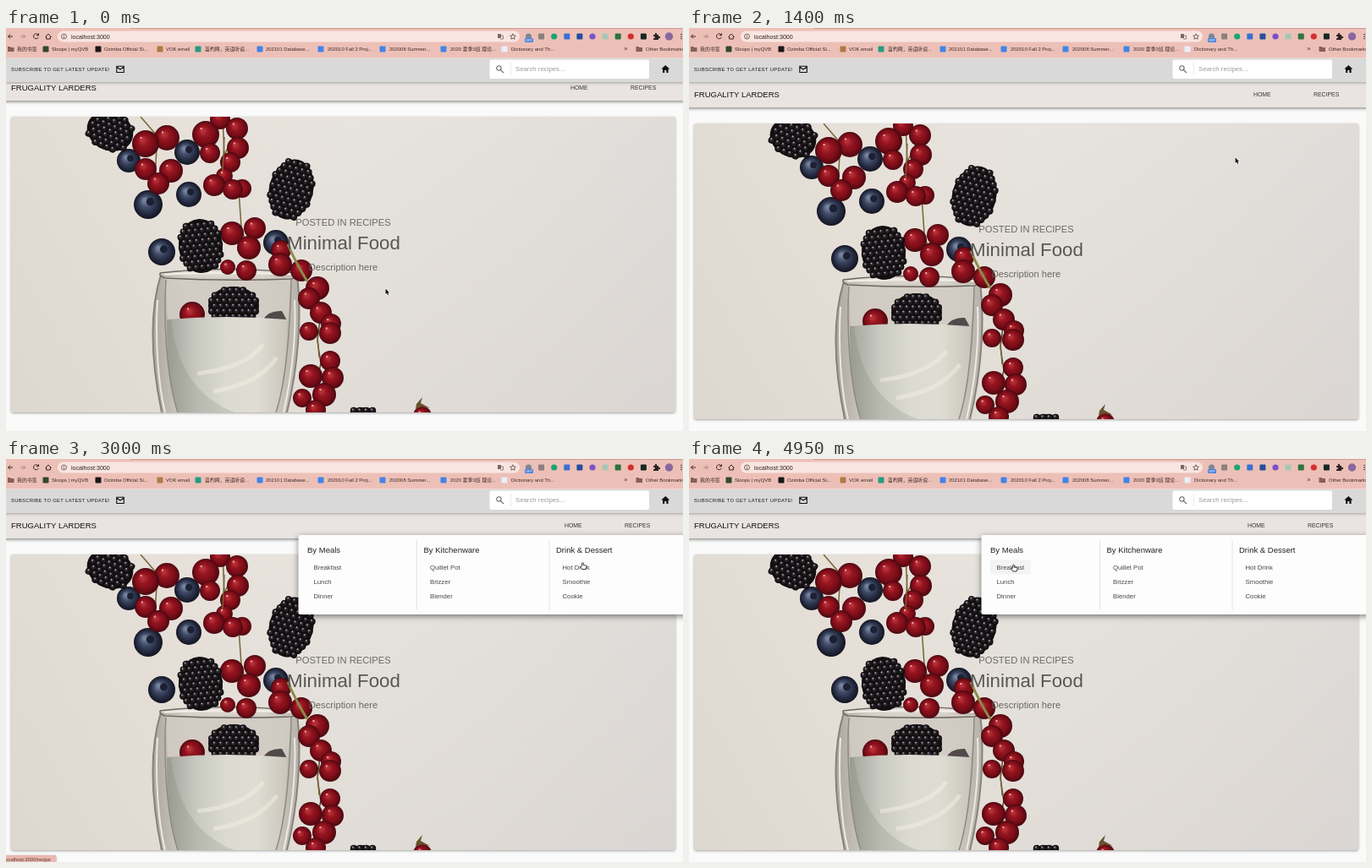
Write an HTML page with a canvas that moves like this. It is 800 px wide and 477 px high and loops after 5000 ms.

```html
<!DOCTYPE html>
<html lang="en">
<head>
<meta charset="utf-8">
<title>Recipe site</title>
<style>
html, body { margin: 0; width: 100%; height: 100%; overflow: hidden; background: #fafafa; }
canvas { display: block; }
</style>
</head>
<body>
<canvas id="stage" width="800" height="477"></canvas>
<script>
const LOOP = 5000, TAU = Math.PI * 2;
const SANS = '"Liberation Sans", Arial, sans-serif';
const UI = '"Liberation Sans", "Noto Sans CJK SC", "Noto Sans CJK", sans-serif';
const view = document.getElementById('stage').getContext('2d');
let g = view;

// Drawing helpers
function box(x, y, w, h, color, r = 0) {
  g.fillStyle = color;
  g.beginPath();
  g.roundRect(x, y, w, h, r);
  g.fill();
}
function disc(x, y, r, color) {
  g.fillStyle = color;
  g.beginPath();
  g.arc(x, y, r, 0, TAU);
  g.fill();
}
function stroke(path, color, width = 1) {
  g.strokeStyle = color;
  g.lineWidth = width;
  g.stroke(new Path2D(path));
}
function fill(path, color) {
  g.fillStyle = color;
  g.fill(new Path2D(path));
}
function text(str, x, y, size, color, { align = 'left', font = SANS, spacing = 0, weight = 400 } = {}) {
  g.font = `${weight} ${size}px ${font}`;
  g.textAlign = align;
  g.letterSpacing = spacing + 'px';
  g.fillStyle = color;
  g.fillText(str, x, y);
}
function withShadow(color, blur, dy, draw) {
  g.save();
  g.shadowColor = color;
  g.shadowBlur = blur;
  g.shadowOffsetY = dy;
  draw();
  g.restore();
}
function blend(x0, y0, x1, y1, ...colors) {
  const grad = g.createLinearGradient(x0, y0, x1, y1);
  colors.forEach((c, i) => grad.addColorStop(i / (colors.length - 1), c));
  return grad;
}
function ball(x, y, r, ...colors) {
  const grad = g.createRadialGradient(x - r * .25, y - r * .3, r * .1, x, y, r);
  colors.forEach((c, i) => grad.addColorStop(i / (colors.length - 1), c));
  disc(x, y, r, grad);
}

// Time helpers
const clamp = v => Math.min(1, Math.max(0, v));
const ease = v => v * v * (3 - 2 * v);
function track(keys, t) {
  let i = keys.findIndex(k => k[0] > t);
  if (i < 0) return keys[keys.length - 1].slice(1);
  i = Math.max(i, 1);
  const [a, b] = [keys[i - 1], keys[i]];
  const p = ease(clamp((t - a[0]) / (b[0] - a[0])));
  return a.slice(1).map((v, n) => v + (b[n + 1] - v) * p);
}

// Hero picture
const PHOTO = { x: 6, y: 113, w: 785, h: 350 };
const currants = [
  [190, 138, 15], [165, 145, 16], [165, 175, 13], [195, 177, 14], [180, 192, 13],
  [253, 116, 12], [273, 127, 13], [236, 134, 16], [241, 156, 12], [274, 150, 13], [265, 167, 12],
  [258, 183, 10], [246, 194, 13], [279, 198, 11], [268, 199, 12],
  [294, 245, 13], [267, 251, 14], [287, 268, 14], [262, 291, 9], [284, 295, 12],
  [325, 271, 12], [324, 288, 14], [349, 295, 13], [368, 316, 14], [358, 328, 13],
  [372, 345, 13], [384, 358, 12], [358, 367, 11], [383, 369, 13], [383, 402, 12],
  [386, 422, 13], [360, 420, 14], [350, 446, 11], [376, 442, 14], [366, 460, 12], [492, 467, 11]
];
const blueberries = [[145, 165, 14], [214, 155, 15], [168, 217, 17], [216, 205, 15], [184, 273, 16], [319, 262, 15]];
const blackberries = [[123, 130, 30, 25, .4], [337, 199, 28, 38, .25], [230, 266, 28, 34, -.1], [422, 467, 19, 12, 0]];

function currant(x, y, r) {
  ball(x, y, r, '#b8323a', '#94141f', '#7c0d18', '#480810');
  g.fillStyle = 'rgba(255,225,220,.7)';
  g.fillRect(x - r * .4, y - r * .5, 2, 2);
}
function blueberry(x, y, r) {
  ball(x, y, r, '#77829d', '#424d69', '#272e45', '#121420');
  disc(x + r * .15, y - r * .2, r * .28, '#1c2033');
}
function blackberry(x, y, rx, ry, turn) {
  g.save();
  g.translate(x, y);
  g.rotate(turn);
  g.fillStyle = '#131012';
  g.beginPath();
  g.ellipse(0, 0, rx - 2, ry - 2, 0, 0, TAU);
  g.fill();
  const step = 7.4;
  for (let row = -6; row <= 6; row++) {
    for (let col = -5; col <= 5; col++) {
      const px = (col + (row & 1) / 2) * step, py = row * step * .84;
      if ((px / (rx - 3)) ** 2 + (py / (ry - 3)) ** 2 > 1) continue;
      ball(px, py, 4.1, '#48414a', '#1f1a1e', '#0b090a');
      disc(px - 1, py - 1.4, .8, 'rgba(235,230,235,.75)');
    }
  }
  g.restore();
}
function glass() {
  fill('M183 300C169 345 171 400 184 463H332C345 410 350 350 344 300Z', blend(172, 0, 348, 0, '#aaa69e', '#d6d2ca', '#d9d4cd', '#d7d2ca', '#b5b0a8'));
  fill('M188 303H338L333 353H191Z', 'rgba(211,204,196,.85)');
  g.save();
  g.beginPath();
  g.rect(180, 300, 160, 54);
  g.clip();
  currant(220, 347, 15);
  fill('M303 354Q310 342 326 343L332 354Z', '#51494a');
  blackberry(269, 337, 32, 25, 0);
  g.restore();
  fill('M190 353Q260 347 332 353C333 390 328 430 319 463H204C194 440 190 400 190 353Z', blend(190, 0, 332, 0, '#a3a49b', '#c8c9c0', '#dbdbd2', '#dfddd3', '#cac6bb'));
  fill('M190 353C190 400 194 440 204 463H270C225 445 202 410 195 353Z', 'rgba(115,119,110,.2)');
  stroke('M226 417Q285 410 304 382M245 438Q298 430 320 398', 'rgba(242,237,225,.55)', 5);
  stroke('M183 300C169 345 171 400 184 463', '#858179', 2);
  stroke('M344 300C350 350 345 410 332 463', '#88827a', 2);
  stroke('M189 306C186 350 189 420 203 463M337 306C336 350 333 420 319 463', '#8d8980', 1.5);
  stroke('M179 330C176 380 180 430 188 463M341 330Q344 390 328 463', 'rgba(248,247,242,.8)', 2);
  stroke('M182 298Q260 289 344 298Q346 303 337 305Q260 308 188 304Q181 302 182 298', '#6b6761', 1.6);
  stroke('M187 300Q260 295 340 300', '#f4f1eb', 1.3);
}
function makePhoto() {
  const layer = document.createElement('canvas');
  layer.width = PHOTO.w;
  layer.height = PHOTO.h;
  g = layer.getContext('2d');
  g.beginPath();
  g.roundRect(0, 0, PHOTO.w, PHOTO.h, 3);
  g.clip();
  g.translate(-PHOTO.x, -PHOTO.y);
  box(PHOTO.x, PHOTO.y, PHOTO.w, PHOTO.h, blend(6, 113, 791, 220, '#e1dcd4', '#e7e1da', '#e7e3dd', '#e4e0dc', '#e0dcd9'));
  box(PHOTO.x, PHOTO.y, PHOTO.w, PHOTO.h, blend(0, 113, 0, 463, 'rgba(120,105,95,0)', 'rgba(120,105,95,.05)'));
  stroke('M159 113L178 135M178 150L176 185M256 113L259 182M272 130L257 160M275 200L278 243L285 270', '#776335', 1.5);
  glass();
  blueberries.forEach(b => blueberry(...b));
  stroke('M372 345L368 378L372 405L363 445', '#57482c', 1.5);
  currants.forEach(c => currant(...c));
  stroke('M333 264Q342 285 356 308', '#8c8a49', 3);
  stroke('M258 137L256 178M368 372L370 398', '#7a6233', 1.4);
  fill('M485 453L492 445L490 452L501 458L491 456L484 459Z', '#67522d');
  blackberries.forEach(b => blackberry(...b));
  g = view;
  return layer;
}
const photo = makePhoto();

// Browser frame
const bookmarks = [
  [47, 54, 'Sloops | myQVB', '#31492b'], [109, 116, 'Ozimba Official Si...', '#1b1717'],
  [182, 189, 'VOK email', '#b07a45'], [227, 235, '蓝杓网，英语听说...', '#269b83'],
  [300, 307, '202101 Database...', '#4285e8'], [372, 380, '202010 Fall 2 Proj...', '#4285e8'],
  [445, 453, '202008 Summer...', '#4285e8'], [517, 525, '2020 夏季3班 理论...', '#4285e8'],
  [589, 597, 'Dictionary and Th...', '#e9eefa']
];
const extensions = ['#7c8795', '#8c7f7e', '#1ba474', '#3a70d5', '#254f9e', '#7a52c7', '#a9c6b5', '#2f7140', '#d42f2c', '#152923'];

function folder(x) {
  fill(`M${x} 22h3l1 1h3.5v5h-7.5z`, '#85605a');
}
function browser() {
  const ink = '#3a2725';
  box(0, 0, 800, 35.5, '#edc0b7');
  box(147, 0, 653, 1, '#d2988f');
  box(61, 3.5, 546, 13, '#f8e5e1', 6.5);
  stroke('M8 10H2.5M5 7.5L2.5 10L5 12.5', ink);
  stroke('M17 10H22.5M20 7.5L22.5 10L20 12.5', '#a8837d');
  stroke('M38 8A3 3 0 1 0 38.3 11M38.5 6.3V8.8H36', ink);
  stroke('M46.5 10.5L50 7L53.5 10.5M47.7 10V13H52.3V10', ink);
  stroke('M65.5 10a3 3 0 1 0 6 0a3 3 0 1 0-6 0M68.5 9.5V12M68.5 8V8.8', '#5b4541', .8);
  text('localhost:3000', 77, 12.5, 7.1, '#2c2221');
  box(581, 7, 4, 5, '#756965', .5);
  stroke('M584.5 9H587.5V13H584', '#756965', .8);
  stroke('M599 6.8L600 9L602.4 9.3L600.6 10.9L601.1 13.2L599 12L596.9 13.2L597.4 10.9L595.6 9.3L598 9Z', '#514441', .8);
  extensions.forEach((color, i) => {
    const x = 617.5 + i * 15.1;
    if (i % 3 === 2 || i === 0) disc(x, 10, 3.6, color);
    else box(x - 3.5, 6.5, 7, 7, color, 1);
  });
  box(613, 12, 10, 5, '#4a82df', 1);
  text('OFF', 618, 16, 4, '#fff', { align: 'center' });
  fill('M765 8H767A1.3 1.3 0 1 1 769 8H771V10A1.3 1.3 0 1 1 771 12V14H765V12A1.2 1.2 0 1 0 765 10Z', '#2b2422');
  disc(783.5, 10, 4.7, '#8a679f');
  for (const y of [7.5, 10, 12.5]) disc(798, y, .8, ink);

  folder(2);
  text('我的书签', 13, 27.2, 5.9, ink, { font: UI });
  for (const [x, tx, label, color] of bookmarks) {
    box(x - 3.5, 21.5, 7, 7, color, 1);
    text(label, tx, 27.2, 5.9, ink, { font: UI });
  }
  text('»', 730.5, 27.2, 7, ink);
  folder(744.5);
  text('Other Bookmarks', 756, 27.2, 5.9, ink, { font: UI });
}

// Page
function topBar(y) {
  g.save();
  g.translate(0, y);
  withShadow('rgba(0,0,0,.3)', 3, 1, () => box(-5, 36, 810, 28, '#d9d9d9'));
  text('SUBSCRIBE TO GET LATEST UPDATE!', 6, 50.7, 5.8, '#151515', { spacing: .35, weight: 500 });
  stroke('M130.8 45.3H139.3V52.5H130.8ZM131 46.2L135 49L139 46.2', '#111', 1.1);
  box(571.5, 37.5, 188.5, 22.5, '#fff', 2);
  stroke('M579.7 47.5a2.7 2.7 0 1 0 5.4 0a2.7 2.7 0 1 0-5.4 0M584.5 49.6L588 53', '#696969', 1.1);
  stroke('M596.5 41V56', '#e5e5e5', .8);
  text('Search recipes...', 602, 51.2, 7.8, '#9b9b9b');
  fill('M779.3 44L774.3 48.6H776V53H778.2V50H780.4V53H782.6V48.6H784.3Z', '#111');
  g.restore();
}
function page(y, navShift) {
  box(0, 35, 800, 442, '#fafafa');
  g.save();
  g.translate(0, y);
  withShadow('rgba(0,0,0,.35)', 3, 1, () => box(PHOTO.x, PHOTO.y, PHOTO.w, PHOTO.h, '#e5e0da', 3));
  g.drawImage(photo, PHOTO.x, PHOTO.y);
  const centre = { align: 'center' };
  text('POSTED IN RECIPES', 398.5, 242, 11.2, '#6d6966', centre);
  text('Minimal Food', 399, 270, 22.3, '#595653', centre);
  text('Description here', 398.5, 295.3, 11.2, '#6a6663', centre);
  withShadow('rgba(0,0,0,.55)', 4, 1.2, () => box(-5, 64, 810, 30, '#e9e4e1'));
  text('FRUGALITY LARDERS', 6, 82.2, 9.5, '#111');
  text('HOME', 667 - navShift, 81.3, 6.9, '#363433');
  text('RECIPES', 738 - navShift, 81.3, 6.9, '#363433');
  g.restore();
  topBar(Math.max(0, y));
}

const columns = [
  { x: 356, w: 48, title: 'By Meals', items: ['Breakfast', 'Lunch', 'Dinner'] },
  { x: 493.5, w: 66.5, title: 'By Kitchenware', items: ['Quillet Pot', 'Brizzer', 'Blender'] },
  { x: 650, w: 67, title: 'Drink & Dessert', items: ['Hot Drink', 'Smoothie', 'Cookie'] }
];
// Spans in which the pointer rests on a link; col is the hovered menu column
const links = [
  { from: 1500, to: 2200 },
  { from: 2960, to: 3400, col: 2 },
  { from: 3820, to: 4350, col: 1 },
  { from: 4680, to: LOOP, col: 0 }
];
function menu(t) {
  g.save();
  g.globalAlpha = clamp((t - 1560) / 180);
  withShadow('rgba(0,0,0,.5)', 7, 2, () => box(345.5, 90, 462, 94, '#fdfdfd', 2));
  stroke('M485.5 96V179M642 96V179', '#e2e2e2', .9);
  columns.forEach(({ x, w, title, items }, col) => {
    const link = links.find(l => l.col === col);
    const glow = clamp((t - link.from - 40) / 150) * clamp((link.to + 150 - t) / 150);
    if (glow > 0) box(x, 119.5, w, 17, `rgba(0,0,0,${.04 * glow})`, 2);
    text(title, x, 111, 9.5, '#222');
    items.forEach((item, i) => text(item, x + 7.5, 130.6 + i * 17, 7.75, '#484848'));
  });
  g.restore();
}

function status(t) {
  const shown = t >= 2050 && t < 3060 ? ['recipe', 59.5]
    : t >= 3920 && t < 4550 ? ['recipe/category/kitchenware/quillet_pot', 149.5] : null;
  if (!shown) return;
  withShadow('rgba(0,0,0,.25)', 2, 0, () => box(-4, 469, shown[1] + 4, 12, '#e9b8ae', 2));
  text('localhost:3000/' + shown[0], -2, 475.7, 5.8, '#5c3832');
}

const scrollKeys = [[0, -8], [60, -8], [300, 0], [400, 0], [650, 1.5], [950, 1.5], [1150, 0]];
const pointerKeys = [
  [0, 448.5, 308.5], [500, 448.5, 308.5], [900, 449.7, 304.5], [1100, 450, 304], [1600, 750.5, 72.5],
  [2200, 750.5, 72.5], [2980, 681.5, 122.5], [3350, 681.5, 123], [3950, 531.5, 124.5],
  [4300, 531.5, 124.5], [4800, 383.5, 125]
];
function pointer(t) {
  g.save();
  g.translate(...track(pointerKeys, t));
  if (links.some(l => t >= l.from && t < l.to)) {
    const hand = 'M-.8 4V.7Q0-.4 .8 .7V3L3.8 3.6Q4.7 4 4.4 5.3L3.5 8H-.6L-2.9 5.2Q-2.6 4-1.6 4.7Z';
    fill(hand, '#fff');
    stroke(hand, '#222', .9);
  } else {
    const arrow = 'M0 0V6.6L1.5 5.3L2.6 7.7L3.7 7.2L2.7 4.9H4.6Z';
    stroke(arrow, '#fff', 1.2);
    fill(arrow, '#111');
  }
  g.restore();
}

function render(now) {
  const t = now % LOOP;
  const [scroll] = track(scrollKeys, t);
  page(scroll, t >= 1560 ? 7 : 0);
  if (t >= 1560) menu(t);
  browser();
  status(t);
  pointer(t);
}
const start = performance.now();
function tick() {
  render(performance.now() - start);
  requestAnimationFrame(tick);
}
tick();
</script>
</body>
</html>
```
